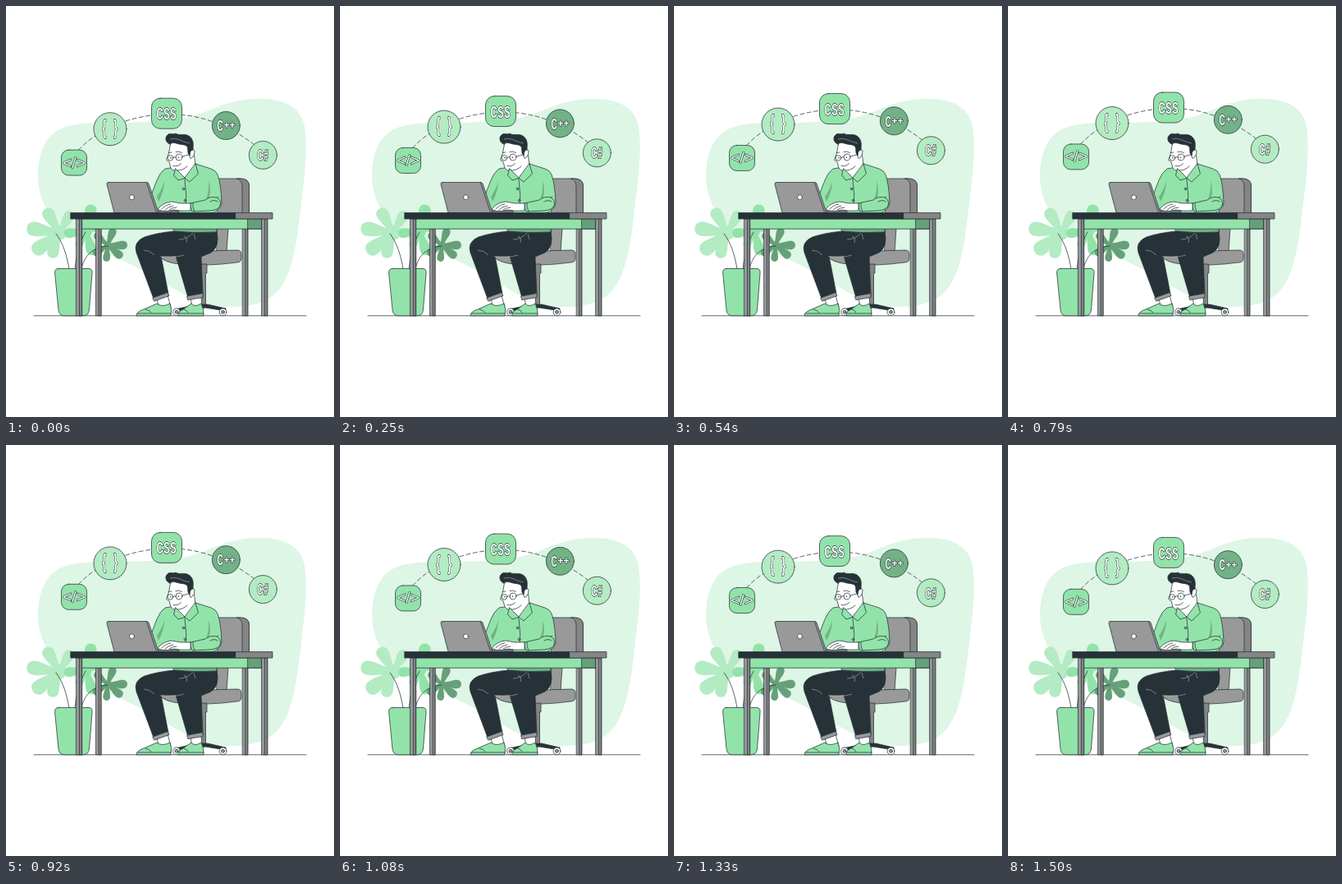
Recreate the animation shown at these times as an HTML page. Size 400 by 500 pixels, loop 1540 ms.

```html
<!DOCTYPE html>
<html lang="en">
<head>
<meta charset="utf-8">
<title>Developer at a desk</title>
<style>
  html, body { margin: 0; width: 100%; height: 100%; overflow: hidden; background: #fff; }
  svg { display: block; width: 100%; height: 100%; }
  .ink { stroke: #263238; stroke-width: .75; stroke-linejoin: round; stroke-linecap: round; }
  .line { fill: none; }
  .green { fill: #92e3a9; }
  .light { fill: #b3ebc3; }
  .deep { fill: #72b286; }
  .moss { fill: #66a078; }
  .dark { fill: #263238; }
  .grey { fill: #999; }
  .shade { fill: #858585; }
  .white { fill: #fff; }
  .crease { fill: none; stroke: #a9b0b3; stroke-width: .6; }
  text {
    font: bold 19px "Liberation Sans", Arial, sans-serif;
    text-anchor: middle; fill: #fff; stroke: #263238; stroke-width: 1.2;
    stroke-linejoin: round; paint-order: stroke; vector-effect: non-scaling-stroke;
  }
  .narrow { transform: scaleX(.53); letter-spacing: 1.2px; }
  .thin { font-weight: normal; }
</style>
</head>
<body>
<svg viewBox="0 0 400 500">
  <defs>
    <path id="petal" d="M-3 0C-3 -11 -7 -17 -6.5 -24C-6 -32 6 -32 6.5 -24C7 -17 3 -11 3 0Z"/>
  </defs>

  <path fill="#def6e5" d="M39 207C39 180 48 157 68 149C88 140 119 143 148 142C184 141 214 140 240 130C263 120 283 113 307 113C336 112 359 121 364 146C368 171 365 202 360 240C355 288 349 328 331 347C318 362 296 366 272 366C241 365 222 354 200 341C179 328 154 314 128 303C94 289 66 276 53 253C43 237 39 222 39 207Z"/>
  <path class="ink line" d="M34 376.8H366"/>

  <g id="badges">
    <path class="ink line" stroke-dasharray="5 3.5" d="M83 182C104 155 145 133 196 132C240 131 280 149 310 175"/>
    <g transform="translate(83 190.9)">
      <rect class="ink green" x="-15.5" y="-15.5" width="31" height="31" rx="9"/>
      <text class="thin" y="6">&lt;/&gt;</text>
    </g>
    <g transform="translate(127 150)">
      <circle class="ink light" r="20"/>
      <text class="narrow" y="6" style="font-size:24px">{&nbsp;&nbsp;}</text>
    </g>
    <g transform="translate(196 131)">
      <rect class="ink green" x="-18.5" y="-18.5" width="37" height="37" rx="10.5"/>
      <text class="narrow" y="7.6" style="font-size:21px">CSS</text>
    </g>
    <g transform="translate(268.4 145.8)">
      <circle class="ink deep" r="17"/>
      <text class="narrow" x="-13" y="6.7">C</text>
      <text x="4" y="4" style="font-size:12px">++</text>
    </g>
    <g transform="translate(313.4 181.7)">
      <circle class="ink light" r="17"/>
      <text class="narrow" y="6.7">C#</text>
    </g>
  </g>

  <g id="plant">
    <g id="leaves"></g>
    <path class="ink line" d="M61 277C70 289 74 303 77 320M92 320C95 304 106 293 124 292M84 320C86 304 88 291 97 275"/>
    <path class="ink green" d="M64 319.5H101Q105.6 319.5 105 325L101.5 369Q101 376.8 94 376.8H71Q65 376.8 64 370L59.6 325Q59 319.5 64 319.5Z"/>
  </g>

  <g id="chair">
    <path class="ink grey" d="M258 210H285Q296.5 210 296.5 219V254H258Z"/>
    <path class="ink shade" d="M282 210H286Q296.5 210 296.5 219V254H288V219Q288 212 282 210Z"/>
    <path class="ink grey" d="M258 270H271L269 300H257Z"/>
    <path class="ink grey" d="M192 303Q225 298 282 297Q287 297 287 302V307Q287 312 281 312Q245 317 212 314Q192 312 187 304Z"/>
    <path class="ink shade" d="M235 314H245V325H243.5V364H237.5V325H235Z"/>
    <path class="ink dark" d="M206 369L234 363H246L268 368V371L243 367L208 373Z"/>
    <g class="ink white">
      <circle cx="208" cy="372.3" r="4.4"/><circle cx="264.5" cy="372.3" r="4.4"/>
      <circle class="grey" cx="208" cy="372.3" r="2"/><circle class="grey" cx="264.5" cy="372.3" r="2"/>
    </g>
  </g>

  <g id="legs">
    <path class="ink white" d="M225 354L227 367L239 366L238 354ZM183 354L187 367L201 366L197 352Z"/>
    <path class="ink green" d="M210 376.5Q209 372 216 369L226 362Q230 367 238 362Q242 370 241 376.5Z"/>
    <path class="ink green" d="M159 376.5Q159 372 168 369L184 362Q190 367 200 362Q203 369 201 376.5Z"/>
    <path class="ink line" d="M160 374H201M211 374H241M170 369Q175 370 177 373M217 369Q221 370 222 373"/>
    <path class="ink dark" d="M214 274H257Q261 293 250 300L238 305L240 352L222 355L207 304Q204 288 214 274Z"/>
    <path class="ink dark" d="M250 274Q247 292 231 300Q214 305 189 304L198 350L180 356L159 300Q155 287 169 281Q184 276 205 274Z"/>
    <path class="ink grey" d="M179 355L197 348.5L199 352.5L181 359ZM221 353L240 349.5V354.5L222 357.5Z"/>
    <path class="crease" d="M211 284Q221 284 228 276M217 280Q222 282 220 288M168 297Q175 297 181 303M188 305Q204 307 217 303M229 277L231 284"/>
    <path class="ink deep" d="M203 268H257V275Q230 277 205 274Z"/>
  </g>

  <g id="torso">
    <path class="ink green" d="M207 196L194 198Q188 202 184 212L177 230L186 253H250Q263 247 263 239Q262 216 258 205Q256 200 250 198L231 192Z"/>
    <path class="deep" d="M193 213Q193 225 186 238L184 232Q190 224 193 213ZM247 213Q251 224 247 235L244 236Q248 225 247 213Z"/>
    <path class="ink white" d="M201 165L198.5 179L195.5 187.5L199 189.5L201 197Q203 201 207 200L218 210L231 194L230 185L226 166Z"/>
    <path class="ink line" d="M207 200Q215 201 221 195"/>
    <path class="ink green" d="M206.5 198L204.5 206L210 212L218 209.5ZM231 192L234.5 204L224 214L218 209.5Z"/>
    <path class="ink dark" d="M200 168C195 167 193 160 197 157C199 154 204 157 207 155C211 158 217 155 222 157.5C228 160.5 229 167 228 173C229 178 228 181 225 184L222 179L221.5 172C219 168 215 169 211 168C206 166.5 203 165.5 200 168Z"/>
    <path class="crease" d="M200 162Q206 160 212 163T224 167"/>
    <path class="ink white" d="M224.5 178Q227 173 230 176Q231 181 226 185.5Q223 185.5 224.5 178Z"/>
    <g class="ink line">
      <circle cx="200.4" cy="184.8" r="3.3"/><circle cx="211" cy="184" r="4"/>
      <path d="M203.8 184.4Q205.3 183 207 184M215 183L224.5 180.5M198.5 178.5L202 178M207 177.5Q211 176 214.5 178.5M204 194.5Q210 196 213.5 191.5M218 211Q221 230 219 248M250 234Q254 236 259 232"/>
    </g>
    <circle class="dark" cx="201" cy="184.8" r=".8"/><circle class="dark" cx="210.4" cy="184.2" r=".8"/>
    <circle class="ink deep" cx="216.5" cy="222.5" r="1.3"/><circle class="ink deep" cx="218.5" cy="236.5" r="1.3"/>
    <path class="ink green" d="M225 240L243 236Q249 231 257 233Q263 236 261 243Q259 248 249 249L227 250Q224 245 225 240Z"/>
    <path class="ink line" d="M228 239.5Q227 245 230 250M249 238Q254 235 258 238"/>
  </g>

  <g id="laptop">
    <path class="ink shade" d="M184 249.2H211V251.5H184Z"/>
    <path class="ink white" d="M186 246Q192 239 202 238L213 240L225 240V249Q213 250 205 248L197 249.5Q190 250 186 248Z"/>
    <path class="ink line" d="M190 247Q194 242 201 241M194 248Q198 244 204 243M199 248Q203 245 208 245"/>
    <path class="ink grey" d="M125 214.5H171Q173.5 214.5 174 216L186 251.5H132L123 217Q122.5 214.5 125 214.5Z"/>
    <path class="ink line" d="M171.5 215L183.5 251"/>
    <circle class="ink white" cx="153.5" cy="232.8" r="3"/>
  </g>

  <g id="table" class="ink">
    <path class="grey" d="M109.8 271H116V376.8H109.8ZM288.6 271H294.8V376.8H288.6Z"/>
    <path class="shade" d="M113.5 271H116V376.8H113.5ZM292.2 271H294.8V376.8H292.2Z"/>
    <path class="green" d="M91 259H312V271.2H91Z"/>
    <path class="moss" d="M295 259H312V271.2H295Z"/>
    <path class="grey" d="M85.8 259H92.6V376.8H85.8ZM312 259H318.8V376.8H312Z"/>
    <path class="shade" d="M89.8 259H92.6V376.8H89.8ZM315.8 259H318.8V376.8H315.8Z"/>
    <path class="dark" d="M79 251.6H280V259H79Z"/>
    <path class="shade" d="M280 251.6H325V259H280Z"/>
  </g>
</svg>
<script>
  const badges = document.getElementById('badges');
  const leaves = document.getElementById('leaves');
  const LOOP = 1540, LEAD = 30, LIFT = 8;

  // Each petal is [angle, length] around the leaf's centre.
  function leaf(color, x, y, core, petals) {
    const shapes = petals.map(([angle, length]) =>
      `<use href="#petal" transform="rotate(${angle}) scale(${length / 30})"/>`);
    return `<g class="${color}" transform="translate(${x} ${y})"><circle r="${core}"/>${shapes.join('')}</g>`;
  }

  leaves.innerHTML =
    leaf('light', 65, 276, 9, [[-81, 40], [-30, 34], [30, 30], [-127, 40], [-162, 32], [95, 18]]) +
    leaf('green', 98, 274, 7, [[12, 33], [-96, 27], [165, 30], [-150, 22], [75, 14]]) +
    leaf('moss', 124, 291, 4, [[90, 24], [20, 22], [-48, 21], [130, 23], [185, 20], [-124, 21]]);

  const start = performance.now();
  function draw(now) {
    const phase = ((Math.max(0, now - start) + LEAD) % LOOP) / LOOP;
    const rise = LIFT * (1 - Math.abs(2 * phase - 1));
    badges.setAttribute('transform', `translate(0 ${-rise})`);
    requestAnimationFrame(draw);
  }
  draw(start);
</script>
</body>
</html>
```
